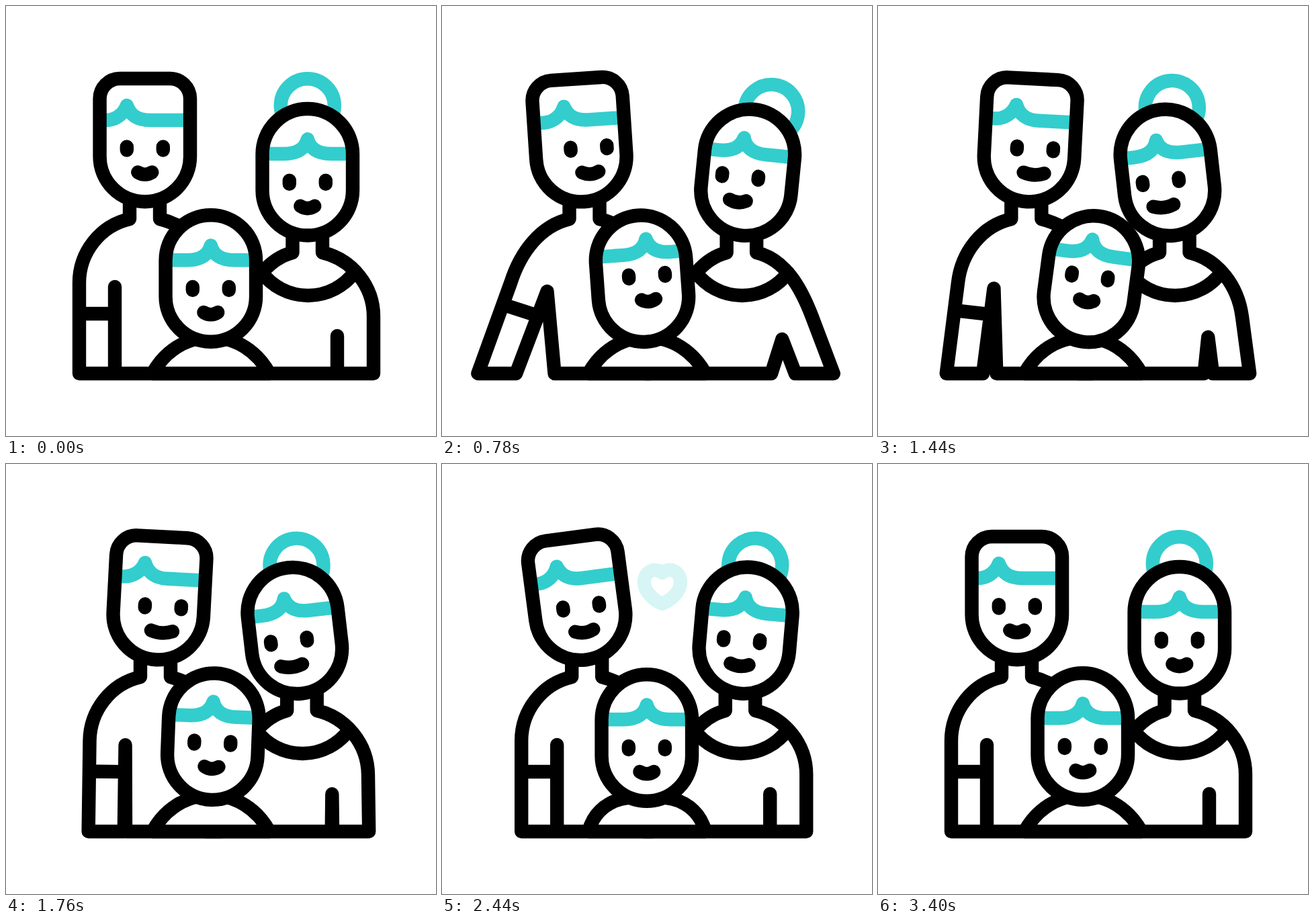
These frames come from a looping animation (640 px wide and 640 px high, 3.6 s). An HTML page without scripts:

```html
<!DOCTYPE html>
<html lang="en">
<head>
<meta charset="utf-8">
<title>Family</title>
<style>
html, body { margin: 0; height: 100%; overflow: hidden; background: #fff; }
svg { display: block; width: 100vw; height: 100vh; }

.line { fill: none; stroke: #000; stroke-width: 20.4; stroke-linecap: round; stroke-linejoin: round; }
.solid { fill: #fff; }
.teal { stroke: #33cdcd; }
.anim, .anim * { animation: 3.6s linear infinite; }
.ease { animation-timing-function: cubic-bezier(.37, 0, .63, 1) !important; }

/* bodies drift towards the middle and back */
.man { --drift: 16px; }
.woman { --drift: -8.3px; }
.anim.drift { animation-name: drift; }
@keyframes drift {
  0%, 2.78%, 87.8%, 100% { translate: 0; }
  50% { translate: var(--drift); }
  54.8% { translate: var(--drift); animation-timing-function: cubic-bezier(.25, 0, .6, 1); }
}
.anim .smile { animation-name: smile; }
@keyframes smile {
  0%, 2.78%, 87.8%, 100% { d: path("M-10.5 35.5Q0 42 10.5 35.5"); }
  50% { d: path("M-16 36Q0 42 16 36"); }
  54.8% { d: path("M-16 36Q0 42 16 36"); animation-timing-function: cubic-bezier(.25, 0, .6, 1); }
}

/* arms swing out */
.anim .man-arm { animation-name: man-arm; }
@keyframes man-arm {
  0%, 2.78%, 50%, 100% { d: path("M184 285L184 317C140 327 109 367 109 412L109 547L162 547L162 418L162 547L305 547"); }
  16.67% { d: path("M184 285L184 317C142 327 112 365 94.5 412L37 547L94.5 547L149 426L162 547L305 547"); }
}
.anim .sleeve { animation-name: sleeve; }
@keyframes sleeve {
  0%, 2.78%, 50%, 100% { d: path("M109 458L162 458"); }
  16.67% { d: path("M80 441.5L132.5 461.5"); }
}
.anim .woman-arm { animation-name: woman-arm; }
@keyframes woman-arm {
  0%, 2.78%, 50%, 100% { d: path("M471 340L471 367C515 377 547 417 547 462L547 547L493 547L493 491L493 547L305 547"); }
  16.67% { d: path("M471 340L471 367C512 377 534 416 554.6 462L592.5 547L535 547L512 497L493 547L305 547"); }
}

/* heads */
.anim .man-head { animation-name: man-head; transform-origin: 0 88px; }
@keyframes man-head {
  0%, 2.78%, 88.9%, 100% { rotate: 0deg; }
  16.67% { rotate: -4.5deg; }
  41.67%, 52.8% { rotate: 3deg; }
  67.2% { rotate: -7.5deg; }
}
.anim .woman-head { animation-name: woman-head; transform-origin: 0 78px; }
@keyframes woman-head {
  0%, 2.78%, 88.9%, 100% { rotate: 0deg; }
  16.67% { rotate: 7deg; }
  41.67%, 54.2% { rotate: -6.6deg; }
  68% { rotate: 5deg; }
}
.anim .child-head { animation-name: child-head; transform-origin: 0 80px; }
@keyframes child-head {
  0%, 2.78%, 54.2%, 100% { rotate: 0deg; }
  16.67% { rotate: -5.6deg; }
  39.5% { rotate: 7.6deg; }
}
.anim .bob { animation-name: bob; }
@keyframes bob {
  0%, 48%, 94.4%, 100% { translate: 0; }
  57.2%, 79% { translate: 0 4px; }
  67.8% { translate: 0 2px; }
}
.anim .shoulders { animation-name: shoulders; }
@keyframes shoulders {
  0%, 48%, 94.4%, 100% { d: path("M218 547C236 514 268 493 305 493C342 493 374 514 392 547Z"); }
  57.2%, 76% { d: path("M218 547C228 510 262 490 305 498C348 490 382 510 392 547Z"); }
}

/* faces, hair and bun slide across the heads */
.slide { animation-name: slide !important; }
@keyframes slide {
  0%, 2.78%, 80.56%, 100% { translate: 0; }
  16.67% { translate: var(--to); }
}
.glance-x { animation-name: glance-x !important; }
@keyframes glance-x {
  0%, 2.78%, 83.3%, 100% { translate: 0; }
  16.67% { translate: -10px; }
  33.33% { translate: -12px; }
  47.2% { translate: -11px; }
}
.lift { animation-name: lift !important; }
@keyframes lift {
  0%, 2.78%, 50%, 100% { translate: 0; }
  16.67% { translate: 0 var(--lift); }
}
.child-face { animation-name: child-face !important; }
@keyframes child-face {
  0%, 2.78%, 54.2%, 100% { translate: 0; }
  16.67% { translate: 8.5px -19px; }
  40% { translate: -2.5px -18.5px; }
}
.child-hair { animation-name: child-hair !important; }
@keyframes child-hair {
  0%, 2.78%, 54.2%, 100% { translate: 0; }
  16.67% { translate: 11.5px -9.5px; }
  40% { translate: -6px -9.5px; }
}

/* heart */
.anim.heart { animation-name: rise; }
@keyframes rise {
  0%, 63.9% { opacity: 0; transform: translate(328px, 201px) scale(.97); }
  67.8% { opacity: .2; transform: translate(328px, 184px); }
  83.3% { opacity: 1; }
  85% { opacity: 1; transform: translate(330px, 107px) rotate(9deg) scale(1.15); }
  92.2%, 100% { opacity: 0; transform: translate(330px, 79px) rotate(0deg) scale(1.15); }
}
.heart path { vector-effect: non-scaling-stroke; }
</style>
</head>
<body>
<svg viewBox="0 0 640 640">
  <defs>
    <path id="oval" d="M-67.25-42a67.25 67.25 0 0 1 134.5 0V12a67.25 67.25 0 0 1-134.5 0Z"/>
    <path id="square" d="M-67.25-74a30 30 0 0 1 30-30h74.5a30 30 0 0 1 30 30V12a67.25 67.25 0 0 1-134.5 0Z"/>
    <clipPath id="in-oval"><use href="#oval"/></clipPath>
    <clipPath id="in-square"><use href="#square"/></clipPath>
    <path id="eyes" class="line" d="M-27-2.5v5M27-2.5v5"/>
    <path id="fringe" class="line teal" d="M-90-42.3H-35C-15-42.3-4-50 0-64C4-50 15-42.3 35-42.3H90"/>
  </defs>

  <g class="anim man drift ease">
    <path class="line" d="M229 285V317C245 321 258 327 275 337"/>
    <path class="line man-arm" d="M184 285L184 317C140 327 109 367 109 412L109 547L162 547L162 418L162 547L305 547"/>
    <path class="line sleeve" style="stroke-linecap:butt" d="M109 458L162 458"/>
    <g transform="translate(206.8 212)">
      <g class="man-head ease">
        <use href="#square" class="solid"/>
        <g clip-path="url(#in-square)">
          <path class="line teal slide" style="--to:6.5px" d="M-90-42H-58C-45-42-32-50-27-64C-22-50-12-42 8-42H90"/>
        </g>
        <use href="#square" class="line"/>
        <g class="slide" style="--to:13px">
          <use href="#eyes"/>
          <path class="line smile ease" d="M-10.5 35.5Q0 42 10.5 35.5"/>
        </g>
      </g>
    </g>
  </g>

  <g class="anim woman drift ease">
    <path class="line" d="M426.5 340V367C407 372 393 383 381 397A86 86 0 0 0 518 397"/>
    <path class="line woman-arm" d="M471 340L471 367C515 377 547 417 547 462L547 547L493 547L493 491L493 547L305 547"/>
    <g transform="translate(448.8 262.3)">
      <g class="woman-head ease">
        <circle class="line teal slide" style="--to:28px 5.5px" cy="-114" r="40"/>
        <use href="#oval" class="solid"/>
        <g clip-path="url(#in-oval)">
          <g class="glance-x"><g class="lift" style="--lift:-2px"><use href="#fringe"/></g></g>
        </g>
        <use href="#oval" class="line"/>
        <g class="glance-x">
          <g class="lift" style="--lift:-9.5px">
            <use href="#eyes"/>
            <path class="line smile ease" d="M-10.5 35.5Q0 42 10.5 35.5"/>
          </g>
        </g>
      </g>
    </g>
  </g>

  <g class="anim">
    <path class="line shoulders ease" style="fill:#fff" d="M218 547C236 514 268 493 305 493C342 493 374 514 392 547Z"/>
    <g class="bob ease">
      <g transform="translate(304.8 420.5)">
        <g class="child-head ease">
          <use href="#oval" class="solid"/>
          <g clip-path="url(#in-oval)">
            <g class="child-hair ease"><use href="#fringe"/></g>
          </g>
          <use href="#oval" class="line"/>
          <g class="child-face ease">
            <use href="#eyes"/>
            <path class="line" d="M-10.5 35.5Q0 42 10.5 35.5"/>
          </g>
        </g>
      </g>
    </g>
  </g>

  <g class="anim heart">
    <path class="line teal" d="M0-22C-10-31-27-25-27-8C-27 8-10 20 0 24C10 20 27 8 27-8C27-25 10-31 0-22Z"/>
  </g>
</svg>
</body>
</html>
```
